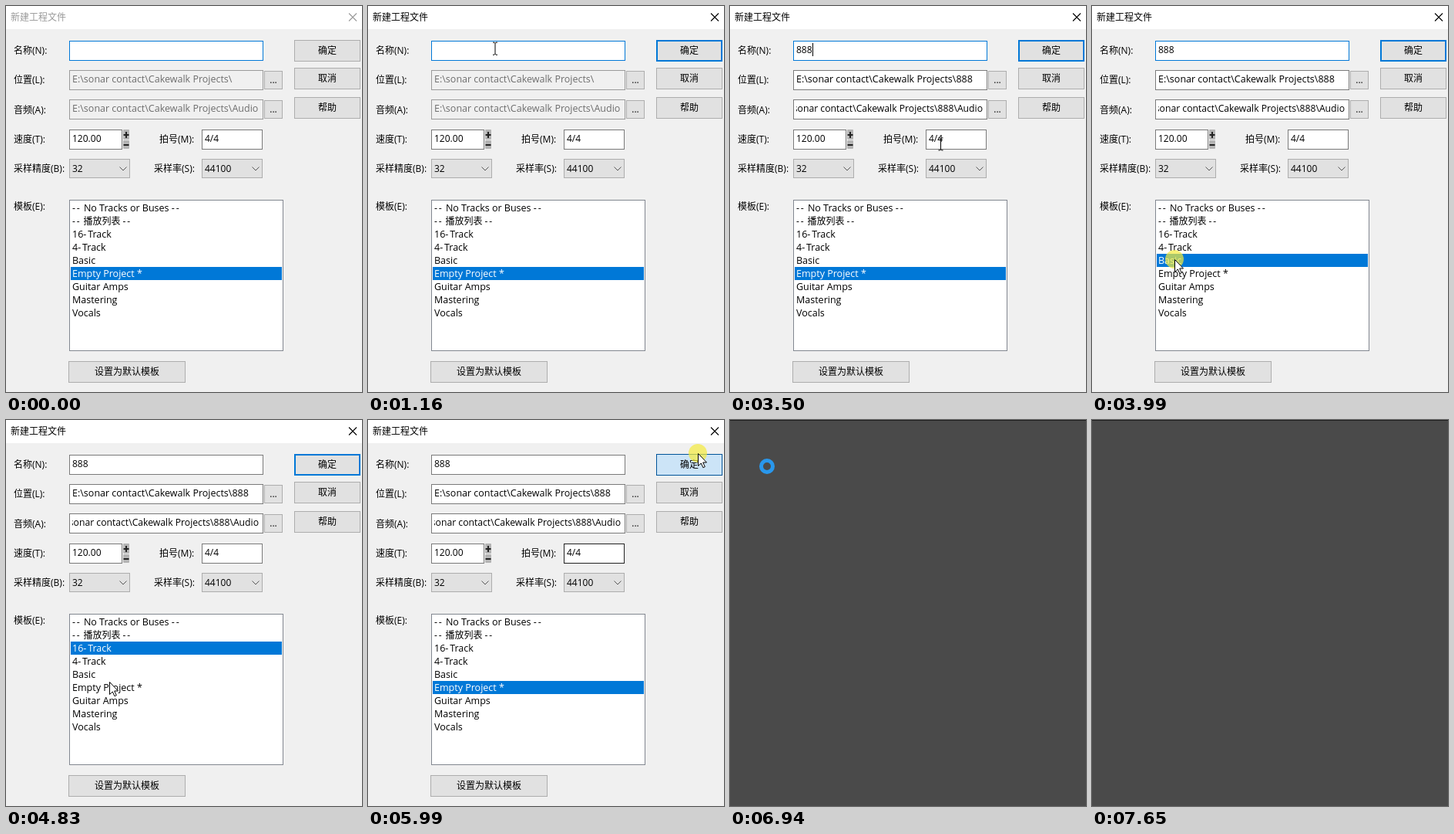
An HTML page for the animation above (7.85 s loop, 462 by 500 pixels).

```html
<!DOCTYPE html>
<html lang="zh-CN">
<head>
<meta charset="utf-8">
<title>新建工程文件</title>
<style>
html, body { margin: 0; width: 100%; height: 100%; overflow: hidden; }
svg { display: block; width: 462px; height: 500px; }
text { font: 12px "Open Sans", "Noto Sans CJK SC", "Noto Sans CJK", sans-serif; white-space: pre; }
.wide { font-size: 12.5px; }
.tight { font-size: 12.2px; }
.dash { letter-spacing: 1.8px; }
.mid { text-anchor: middle; }
</style>
</head>
<body>
<svg id="stage" viewBox="0 0 462 500"></svg>
<script>
const LOOP = 7850;
const BLUE = '#0078d7', EDGE = '#7a7a7a', FACE = '#e1e1e1', RIM = '#adadad', PANEL = '#f0f0f0';
const ROOT = 'E:\\sonar contact\\Cakewalk Projects\\';
const ITEMS = ['-- No Tracks or Buses --', '-- 播放列表 --', '16-Track', '4-Track', 'Basic',
  'Empty Project *', 'Guitar Amps', 'Mastering', 'Vocals'];

const box = (x, y, w, h, fill, stroke, id = '') =>
  `<rect id="${id}" x="${x + .5}" y="${y + .5}" width="${w - 1}" height="${h - 1}" fill="${fill}" stroke="${stroke}"/>`;
const label = (x, y, s, cls = '', id = '') =>
  `<text id="${id}" class="${cls}" x="${x}" y="${y}">${s.replace(/-+/g, '<tspan class="dash">$&</tspan>')}</text>`;
const edit = (x, y, w, id) => box(x, y, w, 26, '#fff', EDGE, id);
const button = (x, y, w, h, s, id) =>
  box(x, y, w, h, FACE, RIM, id) + label(x + w / 2, y + h / 2 + 4, s, 'mid');
const combo = (x, s) => box(x, 198, 79, 25, FACE, RIM) + label(x + 4, 215, s) +
  `<path d="M${x + 65.5} 208.5l4.5 4.5 4.5-4.5" fill="none" stroke="#555"/>`;
const row = (s, i) => label(86, 266 + 17 * i, s, i === 1 ? '' : 'wide', 'row' + i);

document.getElementById('stage').innerHTML = `
<clipPath id="clip"><rect x="86" y="122" width="244" height="24"/></clipPath>
<g id="dialog">
  <rect width="462" height="500" fill="${PANEL}"/>
  <rect width="462" height="30" fill="#fff"/>
  ${label(6, 19, '新建工程文件', '', 'title')}
  <path id="close" d="M445 9.500l10 10m0-10l-10 10" fill="none" stroke-width="1.1"/>
  ${label(10, 62, '名称(N):')}${label(10, 100, '位置(L):')}${label(10, 139, '音频(A):')}
  ${label(10, 177, '速度(T):')}${label(199, 177, '拍号(M):')}
  ${label(10, 215, '采样精度(B):')}${label(192, 215, '采样率(S):')}${label(10, 264, '模板(E):')}
  ${edit(82, 45, 252, 'name')}${label(86, 61, '', '', 'typed')}
  <rect id="caret" y="48" width="1" height="17"/>
  ${edit(82, 83, 252, 'place')}${label(86, 99, '', 'wide', 'placeText')}
  ${edit(82, 121, 252, 'audio')}<g clip-path="url(#clip)">${label(86, 137, '', 'wide', 'audioText')}</g>
  ${button(335, 84, 24, 24, '...')}${button(335, 122, 24, 24, '...')}
  ${edit(82, 160, 69, 'tempo')}${label(86, 176, '120.00')}
  <rect x="152" y="160" width="8" height="13" rx="1" fill="#b4b4b4"/>
  <rect x="152" y="174" width="8" height="11" rx="1" fill="#b4b4b4"/>
  <path d="M152.500 167h7M156 163v8M152.500 180h7" stroke="#222" stroke-width="2"/>
  ${edit(254, 160, 79, 'meter')}${label(258, 176, '4/4')}
  ${combo(82, '32')}${combo(254, '44100')}
  ${button(374, 44, 86, 28, '确定', 'ok')}
  ${button(374, 80, 86, 28, '取消')}${button(374, 118, 86, 28, '帮助')}
  ${box(82, 251, 278, 196, '#fff', '#828790')}
  <rect id="pick" x="84" width="274" height="17" fill="${BLUE}"/>
  ${ITEMS.map(row).join('')}
  ${button(81, 460, 152, 28, '设置为默认模板')}
</g>
<g id="dark">
  <rect width="462" height="500" fill="#4a4a4a"/>
  <rect width="462" height="1" fill="#1e1e1e"/>
</g>
<g id="pointer">
  <circle id="glow" r="12" fill="#f3ea3c" opacity=".7"/>
  <path id="arrow" d="M.5.5V16.500L4.300 13 6.900 18.700 9.300 17.600 6.700 12H11.500Z" fill="#fff" stroke="#000"/>
  <path id="beam" d="M-3-8h2l1 1 1-1h2M0-7V7M-3 8h2l1-1 1 1h2" fill="none" stroke="#000"/>
  <circle id="ring" r="7.500" fill="none" stroke="#2997ec" stroke-width="5"/>
</g>`;

const el = {};
document.querySelectorAll('[id]').forEach(n => { if (n.id) el[n.id] = n; });
const set = (n, attrs) => { for (const k in attrs) n.setAttribute(k, attrs[k]); };
const show = (n, on) => set(n, { visibility: on ? 'visible' : 'hidden' });
const within = (t, a, b) => t >= a && t < b;

// bursts of pointer motion: start, end, number of steps
const BURSTS = [[0, 0, 1], [70, 810, 11], [880, 1230, 6], [2750, 2750, 1], [2950, 3710, 12], [3780, 4550, 12],
  [4620, 4830, 4], [5050, 5170, 3], [5320, 6060, 11], [6190, 6940, 12], [7020, 7650, 10]];
// pointer way points: time, x, y
const PATH = [[0, 329, 430], [70, 329, 430], [780, 165, 56], [1230, 165, 55], [2750, 165, 44], [2885, 165, 44],
  [3230, 400, 58], [3700, 108, 337], [3900, 107, 328], [4060, 107, 328], [4340, 130, 296], [4550, 130, 292],
  [4820, 134, 339], [5050, 134, 340], [5255, 134, 340], [5900, 428, 43], [6190, 428, 43],
  [6500, 319, 77], [6620, 260, 81], [6930, 48, 60], [6960, 48, 60], [7650, 427, 515]];
const CLICKS = [[880, 1150], [3910, 4120], [4330, 4540], [5050, 5320], [5910, 6060]];

function snap(t) {
  const [a, b, n] = BURSTS.filter(s => s[0] <= t).pop();
  if (t >= b) return b;
  const d = (b - a) / (n - 1);
  return a + Math.floor((t - a) / d + 1e-6) * d;
}

function place(t) {
  const i = PATH.findIndex(p => p[0] > t);
  if (i < 0) return PATH[PATH.length - 1].slice(1);
  const [a, x, y] = PATH[i - 1], [b, u, v] = PATH[i], k = (t - a) / (b - a);
  return [x + (u - x) * k, y + (v - y) * k];
}

function blend(k) {
  const mix = (a, b) => Math.round(a + (b - a) * k);
  return `rgb(${mix(0, 122)},${mix(120, 122)},${mix(215, 122)})`;
}

function drawPointer(t, x, y) {
  const busy = t >= 6060;
  const overEdit = !busy && ((within(x, 82, 334) && within(y, 46, 71)) || (within(x, 254, 333) && within(y, 160, 186)));
  const shown = within(t, 70, 1960) || within(t, 2750, 7650);
  set(el.pointer, { transform: `translate(${x.toFixed(1)} ${y.toFixed(1)})` });
  show(el.arrow, shown && !busy && !overEdit);
  show(el.beam, shown && overEdit);
  show(el.ring, shown && busy);
  show(el.glow, CLICKS.some(([a, b]) => within(t, a, b)));
}

function drawDialog(t, x, y) {
  const active = t >= 950;
  set(el.title, { fill: active ? '#000' : '#999' });
  set(el.close, { stroke: active ? '#000' : '#999' });

  const typed = '8'.repeat([1960, 2090, 2220].filter(a => t >= a).length);
  const on = typed !== '';
  el.typed.textContent = typed;
  el.placeText.textContent = ROOT + typed;
  el.audioText.textContent = ROOT + (on ? typed + '\\' : '') + 'Audio';
  set(el.audioText, { class: on ? 'tight' : 'wide', x: on ? 328 : 86, 'text-anchor': on ? 'end' : 'start' });
  for (const n of [el.placeText, el.audioText]) set(n, { fill: on ? '#000' : '#6d6d6d' });
  for (const n of [el.place, el.audio]) set(n, { fill: on ? '#fff' : PANEL, stroke: on ? EDGE : '#9a9a9a' });

  const blink = Math.floor((t - (t < 1960 ? 1230 : 2220)) / 530) % 2 === 0;
  set(el.caret, { x: 86 + 7 * typed.length });
  show(el.caret, within(t, 1230, 3910) && (within(t, 1960, 2220) || blink));
  set(el.name, { stroke: blend(Math.min(1, Math.max(0, (t - 4020) / 200))) });
  set(el.meter, { stroke: within(t, 5580, 6060) ? '#222' : EDGE });

  const chosen = within(t, 3910, 4340) ? 4 : within(t, 4340, 5110) ? 2 : 5;
  set(el.pick, { y: 253 + 17 * chosen });
  ITEMS.forEach((_, i) => set(el['row' + i], { fill: i === chosen ? '#fff' : '#000' }));

  const hover = t > 2750 && within(x, 374, 460) && within(y, 43, 72);
  const down = hover && t >= 5910;
  const thick = active && !hover;
  set(el.ok, {
    fill: down ? '#cce4f7' : hover ? '#e5f1fb' : FACE,
    stroke: down ? '#005499' : active ? BLUE : RIM,
    'stroke-width': thick ? 2 : 1,
    x: thick ? 375 : 374.5, y: thick ? 45 : 44.5,
    width: thick ? 84 : 85, height: thick ? 26 : 27
  });
}

function draw(t) {
  const [x, y] = place(snap(t));
  drawDialog(t, x, y);
  show(el.dark, t >= 6060);
  drawPointer(t, x, y);
}

const start = performance.now();
function tick() {
  draw((performance.now() - start) % LOOP);
  requestAnimationFrame(tick);
}
draw(0);
requestAnimationFrame(tick);
</script>
</body>
</html>
```
